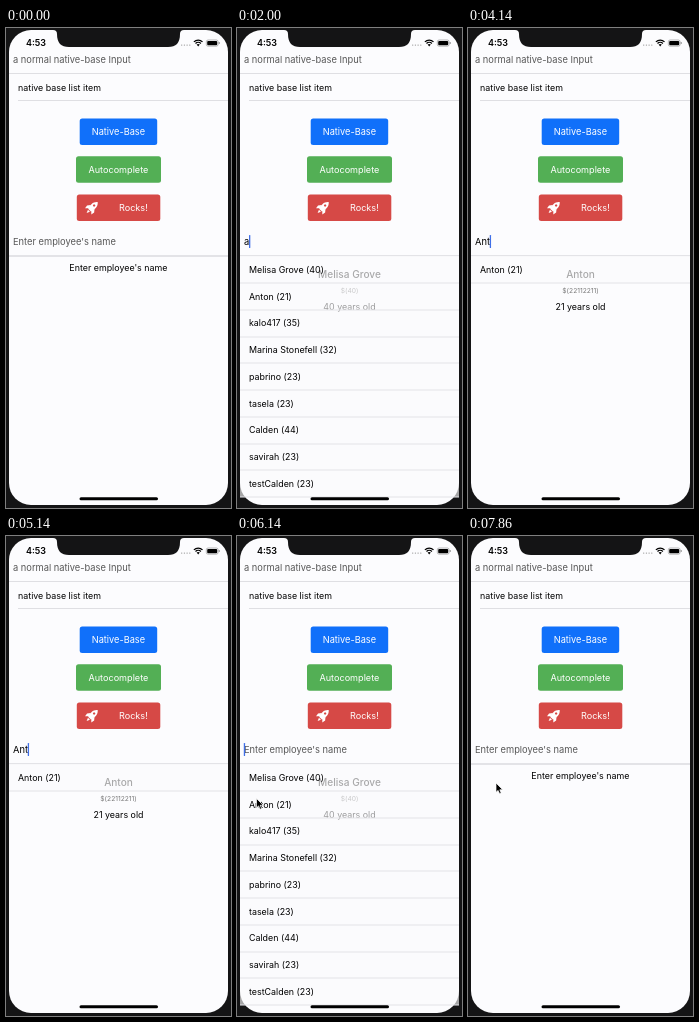
An HTML page with a canvas that plays this animation: 225 px wide and 480 px high, repeating every 8 s.

```html
<!DOCTYPE html>
<html lang="en">
<head>
<meta charset="utf-8">
<title>Autocomplete demo</title>
<style>
  html, body { margin: 0; width: 100%; height: 100%; overflow: hidden; background: #141415; }
  canvas { display: block; width: 225px; height: 480px; }
</style>
</head>
<body>
<canvas id="stage"></canvas>
<script>
const W = 225, H = 480, LOOP = 8000, TICK = 1000 / 7;
const canvas = document.getElementById('stage');
const ctx = canvas.getContext('2d');
const dpr = window.devicePixelRatio || 1;
canvas.width = W * dpr;
canvas.height = H * dpr;

const PAPER = '#fcfcfe', LINE = '#dfdfe3';
const INPUT_SIZE = 9.3, LIST_SIZE = 8.9, ROW = 26.75, LIST_TOP = 228.3;
const PROMPT = "Enter employee's name";

const people = [
  ['Melisa Grove', 40], ['Anton', 21, 22112211], ['kalo417', 35],
  ['Marina Stonefell', 32], ['pabrino', 23], ['tasela', 23],
  ['Calden', 44], ['savirah', 23], ['testCalden', 23]
].map(([name, age, pay = age]) => ({ name, age, pay }));

// All times below are in ticks of 1/7 s.
const typing = [
  [0, ''], [13, 'a'], [26, ''], [27, 'A'], [28, 'An'], [29, 'Ant'], [32, 'Anto'],
  [33, 'Anton'], [35, 'Anto'], [36, 'Ant'], [37, 'An'], [38, 'A'], [40, '']
];
const blink = [
  [0, 0], [3, 1], [5, 0], [6, 0], [8, 1], [10, 0], [12, 0], [13, 1], [19, 1], [21, 0],
  [22, 0], [24, 1], [43, 1], [45, 0], [49, 0], [52, 1], [53, 1], [55, 0]
];
const pointerPaths = [
  [[18, 1, 258], [21, 34, 282], [24, 31, 269], [26, 31, 269]],
  [[42, 31, 269], [44, 8, 256], [47, 28, 247], [56, 28, 247]]
];
const listOpen = [13, 44];

function sample(keys, t) {
  const last = keys[keys.length - 1];
  if (t >= last[0]) return last.slice(1);
  const i = keys.findIndex(k => k[0] > t);
  const a = keys[i - 1], b = keys[i];
  const u = (t - a[0]) / (b[0] - a[0]);
  return a.slice(1).map((v, j) => v + (b[j + 1] - v) * u);
}

function font(size, weight = 400) {
  ctx.font = `${weight} ${size}px Inter, "Liberation Sans", sans-serif`;
}

function text(str, x, y, size, color = '#000', align = 'left', weight = 400) {
  font(size, weight);
  ctx.fillStyle = color;
  ctx.textAlign = align;
  ctx.fillText(str, x, y);
}

function box(x, y, w, h, r, color) {
  ctx.fillStyle = color;
  ctx.beginPath();
  ctx.roundRect(x, y, w, h, r);
  ctx.fill();
}

function rule(x, y, color = LINE, h = 1) {
  ctx.fillStyle = color;
  ctx.fillRect(x, y, 222 - x, h);
}

function shape(points, color) {
  ctx.beginPath();
  points.forEach(([x, y]) => ctx.lineTo(x, y));
  ctx.closePath();
  ctx.fillStyle = color;
  ctx.fill();
}

function rocket(x, y) {
  ctx.save();
  ctx.translate(x, y);
  ctx.rotate(Math.PI / 4);
  ctx.fillStyle = '#fff';
  ctx.beginPath();
  ctx.moveTo(0, -8);
  ctx.bezierCurveTo(3.6, -5, 3.4, -1, 2, 3.5);
  ctx.lineTo(-2, 3.5);
  ctx.bezierCurveTo(-3.4, -1, -3.6, -5, 0, -8);
  ctx.fill();
  for (const s of [-1, 1]) {
    shape([[s * 2.6, -1], [s * 5, 2], [s * 4.4, 5.4], [s * 1.8, 2.8]], '#fff');
  }
  shape([[-1.4, 4.3], [1.4, 4.3], [0, 7.6]], '#fff');
  ctx.fillStyle = '#d64946';
  ctx.beginPath();
  ctx.arc(0, -3, 1.2, 0, 7);
  ctx.fill();
  ctx.restore();
}

function statusBar() {
  text('4:53', 20, 18.3, 9, '#000', 'left', 600);
  for (let i = 0; i < 4; i++) box(175 + i * 2.7, 16.4, 1.4, 1.4, 0.7, '#999');
  ctx.strokeStyle = '#000';
  ctx.lineWidth = 1.3;
  for (const r of [3.8, 6.1]) {
    ctx.beginPath();
    ctx.arc(192.2, 18.2, r, -Math.PI * 0.75, -Math.PI * 0.25);
    ctx.stroke();
  }
  shape([[192.2, 18.4], [190.6, 16.6], [192.2, 15.9], [193.8, 16.6]], '#000');
  ctx.strokeStyle = '#888';
  ctx.lineWidth = 0.6;
  ctx.beginPath();
  ctx.roundRect(200.3, 12, 11.8, 6.2, 1.8);
  ctx.stroke();
  box(201.2, 12.9, 10, 4.4, 1, '#000');
  box(212.8, 14.1, 0.8, 2, 0.4, '#777');
}

function phone() {
  ctx.fillStyle = '#141415';
  ctx.fillRect(0, 0, W, H);
  box(3, 2, 219, 475, 22, PAPER);
  ctx.fillStyle = '#141415';
  ctx.beginPath();
  ctx.moveTo(47, 0);
  ctx.lineTo(47, 2);
  ctx.quadraticCurveTo(51, 2, 51, 6);
  ctx.bezierCurveTo(51, 15, 55, 19, 63, 19);
  ctx.lineTo(162, 19);
  ctx.bezierCurveTo(170, 19, 174, 15, 174, 6);
  ctx.quadraticCurveTo(174, 2, 178, 2);
  ctx.lineTo(178, 0);
  ctx.fill();
  statusBar();
}

function form() {
  text('a normal native-base Input', 7, 34.7, INPUT_SIZE, '#575757');
  rule(3, 45);
  text('native base list item', 12, 62.5, LIST_SIZE);
  rule(12, 72);
  box(73.7, 90.5, 77.5, 26.5, 2.5, '#1070fa');
  text('Native-Base', 112.4, 107, 9.2, '#fff', 'center');
  box(70, 128.3, 85, 26.5, 2.5, '#53af55');
  text('Autocomplete', 112.4, 145, 9.1, '#fff', 'center');
  box(70.8, 166.4, 83.5, 26.5, 2.5, '#d64946');
  text('Rocks!', 113, 183, 9.1, '#fff');
  rocket(86, 179.6);
}

function field(query, caret) {
  if (query) text(query, 7, 217.2, INPUT_SIZE);
  else text(PROMPT, 7, 217.2, INPUT_SIZE, '#575757');
  font(INPUT_SIZE);
  ctx.globalAlpha = caret;
  box(6.8 + ctx.measureText(query).width, 207, 1.3, 13, 0.5, '#3f6fe8');
  ctx.globalAlpha = 1;
}

function details({ name, age, pay }) {
  text(name, 112.5, 250, 10.1, '#222', 'center', 500);
  text(`$(${pay})`, 112.5, 265.4, 6.7, '#777', 'center');
  text(`${age} years old`, 112.5, 282, LIST_SIZE, '#000', 'center');
}

function list(rows) {
  ctx.fillStyle = 'rgba(252,252,254,.62)';
  ctx.fillRect(3, LIST_TOP, 219, ROW * rows.length);
  rows.forEach(({ name, age }, i) => {
    const y = LIST_TOP + i * ROW;
    text(`${name} (${age})`, 12, y + 16.6, LIST_SIZE);
    rule(3, Math.round(y + ROW) - 0.5, '#e4e4e8');
  });
}

function results(query, open) {
  rule(3, 227, '#e3e3e7', open ? 1.3 : 2);
  if (!open) {
    text(PROMPT, 112.4, 243.2, LIST_SIZE, '#000', 'center');
    return;
  }
  const q = query.toLowerCase();
  const found = people.filter(p => p.name.toLowerCase().includes(q));
  const exact = found.length === 1 && found[0].name.toLowerCase() === q;
  details(found[0]);
  if (!exact) list(found);
}

function pointer(tick) {
  const path = pointerPaths.find(p => tick >= p[0][0] && tick < p[p.length - 1][0]);
  if (!path) return;
  const [x, y] = sample(path, tick);
  const arrow = [[0, 0], [0, 9.3], [2.1, 7.4], [3.6, 10.8], [5.2, 10.1], [3.8, 6.8], [6.7, 6.7]];
  ctx.save();
  ctx.translate(x, y);
  shape(arrow, '#000');
  ctx.strokeStyle = '#fff';
  ctx.lineWidth = 0.7;
  ctx.stroke();
  ctx.restore();
}

function draw(now) {
  const tick = Math.floor(((now % LOOP) + 5) / TICK) % 56;
  const query = typing.filter(k => k[0] <= tick).pop()[1];
  const open = tick >= listOpen[0] && tick < listOpen[1];
  ctx.setTransform(dpr, 0, 0, dpr, 0, 0);
  phone();
  form();
  results(query, open);
  field(query, sample(blink, tick)[0]);
  box(73.5, 469.3, 78.5, 3, 1.5, '#000');
  pointer(tick);
}

const start = performance.now();
function loop() {
  draw(performance.now() - start);
  requestAnimationFrame(loop);
}
loop();
</script>
</body>
</html>
```
